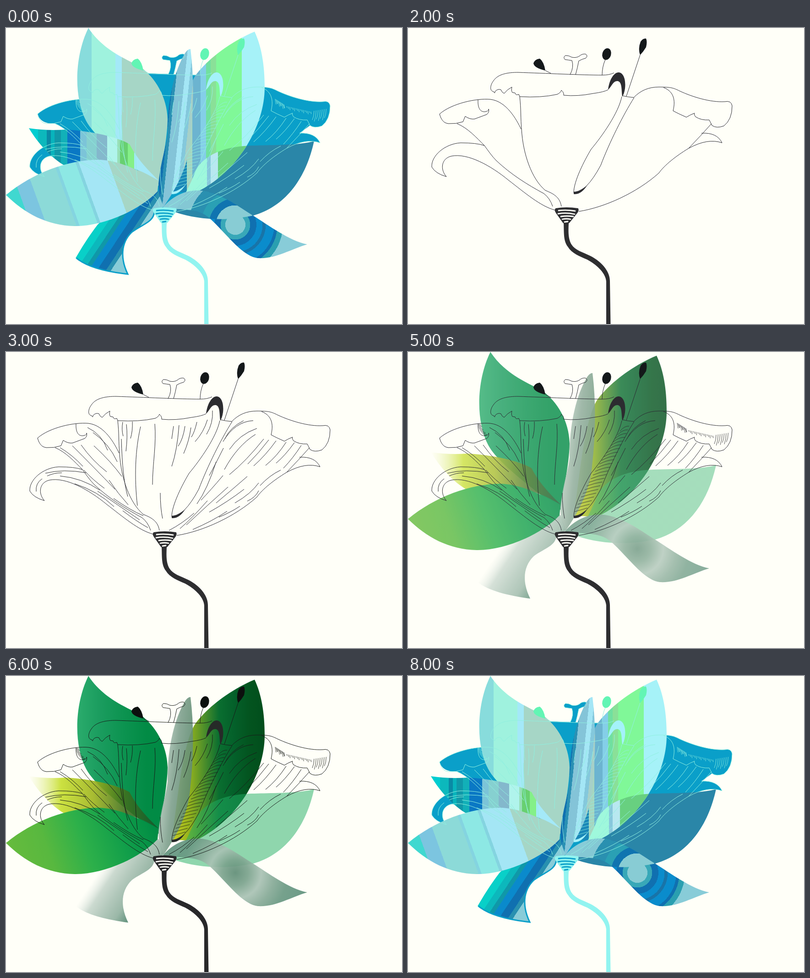
Recreate the animation shown at these times as an HTML page. Size 865x647 px, loop 9000 ms.

```html
<!DOCTYPE html>
<html lang="en">
<head>
<meta charset="utf-8">
<title>Flower</title>
<style>
html, body { margin: 0; width: 100%; height: 100%; overflow: hidden; background: #fffff8; }
svg { position: absolute; left: 0; top: 0; display: block; }
</style>
</head>
<body>
<svg id="stage" width="865" height="647" viewBox="0 0 865 647"></svg>
<script>
const BG = '#fffff8';

const leaf = {
  H: 'M333 356C290 378 235 395 200 430C180 456 164 482 152 503C180 525 230 534 267 539C250 505 250 470 275 446C300 428 322 424 324 402L345 390Z',
  A: 'M180 0C150 60 147 150 175 203C192 235 240 275 333 345C338 305 352 250 353 200C352 150 325 108 295 86C265 68 215 52 180 0Z',
  B: 'M50 219Q90 225 130 222C175 224 240 236 270 254C287 288 312 312 334 334C310 320 290 309 268 305L125 299C95 280 70 252 50 219Z',
  C: 'M0 365C60 315 140 287 205 288C250 290 300 315 333 336L331 357C290 400 210 434 150 433C90 432 40 405 0 365Z',
  E: 'M543 8C490 30 440 68 413 105C385 150 375 270 362 358L413 360C500 320 565 220 565 130C565 80 558 40 543 8Z',
  F: 'M673 247C640 258 560 255 520 258C470 262 432 280 415 310C402 345 385 375 368 402C430 423 490 420 540 410C610 390 655 330 673 247Z',
  G: 'M343 392C365 366 395 352 430 356C470 362 508 390 538 409C572 430 620 466 658 473C620 484 590 505 550 503C512 498 475 440 440 412C420 395 380 395 343 396Z',
  D: 'M403 46Q395 46 387 62C364 105 352 170 353 230C350 260 338 290 333 340Q333 370 345 390C365 360 397 310 402 250C410 180 411 110 403 46Z'
};

// gradient axes: x1 y1 x2 y2, or cx cy r
const axis = {
  H: [153, 502, 250, 566], A: [157, 0, 357, 0], B: [50, 0, 330, 0],
  C: [0, 365, 302, 256], E: [365, 0, 565, 0], X: [365, 0, 565, 0],
  F: [368, 0, 673, 0], G: [501, 430, 170], Y: [501, 430, 170], D: [350, 0, 433, 9]
};

// band ends in percent
const cuts = {
  H: [13, 25, 33, 46, 60, 68, 100], A: [15, 41, 48, 100],
  B: [7, 14, 17, 20, 25, 30, 40, 45, 53, 61, 69, 71, 77, 82, 100],
  C: [9, 19, 38, 40, 52, 54, 73, 100], E: [15, 21, 30, 36, 41, 47, 75, 100],
  X: [37, 41, 49, 100], F: [100], G: [13, 19, 27, 35, 39, 50, 54, 61, 100],
  Y: [25, 34, 44, 60, 100], D: [20, 32, 40, 62, 75, 85, 100]
};

const lime = {
  base: '#00d838', ink: '#90ff70', stem: '#98ff98', dot: '#90ff58', lip: '#a2ffb8',
  H: '#00e000 #00c010 #08a030 #00d850 #18b450 #20b860 #88dc98',
  A: '#90e896 #aefba0 #a2ffbc #b8bfa6',
  B: '#00d838 #00c80c #009c2c #00d030 #08a83c #08d040 #00d850 #7be080 #8edc85 #88cc98 #b0ffc0 #b8e8a0 #d8c860 #ffe860 #a0ffc0',
  C: '#45e84a #74e095 #8ce58a #80e59a #90ee8c #84e59c #a5ffb8 #b8bfa6',
  E: '#1cb850 #b8c0a4 #60d080 #98f0a8 #c8d890 #d0c898 #dcff78 #a2ffb0',
  X: '#a0f8a0 #88dca0 #c0ffd0 #d8d068', F: '#22ab4a',
  G: '#90e0a0 #40c080 #18b058 #00d850 #20a848 #00d850 #20a848 #18b860 #88dc98',
  Y: '#88d898 #20b850 #38c83c #30b850 #84dc90',
  D: '#00c840 #129c46 #1cb050 #88d896 #a2ffb8 #8cd896 #b4c8a4'
};

const blue = {
  base: '#0a9fc9', ink: '#90f0e0', stem: '#92f4f0', dot: '#62f5b4', lip: '#a4f2fa',
  H: '#08d0c8 #0cb8bc #1098a8 #0a8acc #1070b0 #2890b0 #88ccd8',
  A: '#88dcdc #9ff2de #a4e9f8 #a6d6c6',
  B: '#00cdd0 #0cb8bc #0a8aa5 #08b4bc #1098a8 #12b0b8 #0a78c4 #7cc4d8 #86d0d0 #84b8cc #b0f4ec #98e0b8 #68d070 #84f088 #a4e9f8',
  C: '#40d8d0 #7cc5e0 #8cdad8 #84d4e0 #8de8e4 #84d4e0 #a4e6f5 #a6d6c6',
  E: '#1a88b8 #a6d6c0 #6cb4d0 #84cfe8 #70e0a0 #8ae098 #80f898 #a6f2f8',
  X: '#9ff8dc #88c8dc #b8e8f0 #68d080', F: '#2a86a8',
  G: '#88ccd4 #38a8b8 #1070b0 #0a8ccc #1874a8 #0a8ccc #1070b0 #2a9fb0 #88ccd8',
  Y: '#88ccd4 #1074b0 #2aa0b4 #2a90b0 #84c8d4',
  D: '#0a80c4 #1070b0 #2a90b4 #84c4d8 #a4e6f5 #84c8dc #a6d0c8'
};

const green = {
  H: '#e4ece600 #ccdad0 #b2c8bb #9bb8a8 #5f907a',
  A: '#2aab6c #1a9c5e #0c9350 #028b45 #008a45',
  B: '#e0ec9000 #c6de2c #9fb51c #3f701e #14572c',
  C: '#66bb3d #58b83f #2db04a #129f4a #008c44',
  E: '#c4cc22 #98b41c #50902a #0a6e30 #04602a #03541f #024e1c',
  F: '#1fad62',
  G: '#5f8d76 #7ba38d #a9c2b4 #86aa97 #6a9983 #649580 #5f907a',
  D: '#b9ccc0 #a3bcae #7d9f8c #6a937b #5f8a70'
};

const silhouette =
  'M69 188C95 165 150 153 180 156C215 160 237 200 247 221L244 150L310 99L424 103L468 150L494 151C508 137 525 129 548 129C575 129 580 131 594 138C620 150 660 163 692 161Q706 158 708 170Q708 200 690 214Q674 220 664 213L641 230Q675 228 686 251Q655 240 613 263C585 280 560 300 548 317C500 360 430 392 373 401L321 398C255 370 180 285 95 280C72 285 70 310 84 325Q60 318 52 304C50 280 80 253 115 251Q150 251 167 257C150 240 130 218 107 209Q75 210 69 188Z';

const pistil = 'M354 102Q363 85 358 71Q350 70 343 69Q338 64 344 60Q352 60 358 64Q368 66 375 61Q380 56 388 57Q394 61 388 66Q380 68 373 72Q370 88 366 102';

const outline = [
  'M247 221C237 200 215 160 180 156C150 153 95 165 69 188C72 200 78 208 88 209Q105 210 120 205L125 193Q135 200 145 199L172 189Q178 184 176 177C177 180 174 182 168 183C158 184 152 175 153 157',
  'M107 209C130 218 150 240 167 257C175 268 183 280 193 290C225 320 260 342 297 362Q310 372 316 390',
  'M167 257Q150 251 115 251C80 253 50 280 52 304Q60 318 84 325C70 310 72 285 95 280C130 273 180 300 220 333C255 360 290 390 321 398',
  'M187 139C178 138 179 125 187 115C197 100 220 97 240 97C300 99 380 103 424 103Q440 103 450 98M187 139Q190 145 190 139Q196 132 203 135Q205 141 210 143Q217 134 227 129Q225 137 228 141L234 142Q235 148 242 145L244 150Q290 153 326 145Q334 141 335 136Q341 141 340 147Q370 150 405 143Q428 140 437 135',
  'M244 150C247 175 246 200 248 221C251 275 270 330 300 355C318 362 332 370 335 390',
  'M467 150C460 185 425 235 400 265C385 290 362 335 362 360M468 148Q480 151 494 152C470 190 440 250 421 300Q405 330 390 345',
  'M494 151C508 137 525 129 548 129C575 129 580 131 594 138C620 150 660 163 692 161Q706 158 708 170Q708 200 690 214Q674 220 664 213Q660 205 658 201Q640 202 628 194Q624 188 626 186Q616 190 608 195Q592 188 579 181C583 165 585 140 558 130',
  'M663 209Q640 235 613 263C585 280 560 300 548 317C500 360 430 392 373 401M641 230Q675 228 686 251Q655 240 613 263',
  pistil,
  'M300 93L312 99M431 69Q424 85 424 103M507 59L477 149'
];

const veins = [
  'M255 153Q252 170 256 184M263 158Q266 185 262 217M276 152Q277 172 272 189M252 190Q254 275 266 316M294 163C282 215 280 275 287 336M325 157C329 200 320 245 320 290M337 308Q337 340 342 364M366 162L362 190M378 160Q374 215 362 250M391 162Q387 190 376 206M404 165Q400 195 388 222M417 153Q412 175 405 186M440 148Q432 175 413 196M451 128Q453 155 438 180',
  'M118 209Q145 225 168 250M145 205Q190 250 238 300M164 203Q188 237 220 262M178 165Q210 180 222 215M190 176Q225 200 243 240M170 258Q190 280 215 298M192 205Q230 240 253 272M225 280Q245 310 267 334M235 320Q270 345 300 358',
  'M66 305Q64 287 79 277M86 265Q125 255 175 264M90 271Q105 264 122 264M118 271Q165 275 205 302M150 288Q200 304 236 338M200 304Q245 335 292 367M255 347Q285 370 310 384',
  'M540 150Q500 152 474 196M519 150Q489 165 478 190M548 167Q510 180 488 213M475 210Q455 250 444 270M545 180Q505 205 477 257M563 190Q525 238 488 268M590 194Q568 225 541 249M612 197Q592 228 567 248M574 192Q553 220 528 245M630 198Q610 226 590 243M645 204Q627 232 606 254',
  'M459 240Q440 300 417 332M474 270Q447 302 426 324M527 272Q495 300 459 330M485 295Q440 335 394 378M552 286Q535 310 500 330M552 303Q545 318 527 326M520 300Q485 327 444 350M600 258Q575 270 555 292M511 337Q492 350 465 361M483 348Q450 370 408 388M440 325Q405 365 380 386M411 352Q385 375 356 390'
];

const anthers = 'M300 93Q275 87 274 77Q277 68 288 67Q297 74 300 93ZM507 59Q502 45 508 30Q513 22 520 23Q523 30 520 42Q514 52 507 59Z';
const crescent = 'M437 135C440 112 450 97 460 97C472 98 476 115 474 132Q472 145 468 150C466 135 468 118 458 116C448 115 445 128 437 135ZM362 358Q375 358 392 343Q378 365 362 363Z';

const path = (d, attrs) => `<path d="${d}" ${attrs}/>`;
const mix = (a, b, t) => a + (b - a) * t;

function hatch() {
  let d = '';
  for (let i = 0; i < 23; i++) {
    const t = i / 22, y = mix(166, 342, t);
    const l = 364 + 99 * Math.pow(1 - t, 1.15), r = mix(483, 392, Math.pow(t, 1.15));
    d += `M${l} ${y + 7}Q${mix(l, r, .5)} ${y - 5 + 8 * t} ${r} ${y - 4 + 3 * t}`;
  }
  for (let i = 0; i < 11; i++) {
    d += `M${153 + i * i * .13} ${158 + i * 2.4}l${6 + i % 3} ${1 - i * .25}`;
    d += `M${588 + i * 1.9} ${155 + i * 1.2}l${2 + i % 2} ${12 - i % 4 * 2}`;
  }
  for (let i = 0; i < 17; i++) d += `M${613 + i * 3.3} ${171 + i * .75}l1 ${3 + i % 3 * 2}`;
  for (let i = 0; i < 7; i++) d += `M${673 + i * 4.4} ${181 - i * .7}q0 12 -4 ${20 + i % 2 * 4}`;
  return d;
}

function gradient(id, key, colors, ends) {
  const a = axis[key], list = colors.split(' ');
  const stop = (at, c) => `<stop offset="${at}%" stop-color="${c}"/>`;
  const stops = list.map((c, i) => ends
    ? stop(i ? ends[i - 1] : 0, c) + stop(ends[i], c)
    : stop(100 * i / Math.max(1, list.length - 1), c)).join('');
  const tag = a.length === 3 ? 'radialGradient' : 'linearGradient';
  const names = a.length === 3 ? ['cx', 'cy', 'r'] : ['x1', 'y1', 'x2', 'y2'];
  const pos = names.map((n, i) => `${n}="${a[i]}"`).join(' ');
  return `<${tag} id="${id}" gradientUnits="userSpaceOnUse" ${pos}>${stops}</${tag}>`;
}

function defs(name, theme, banded) {
  return Object.keys(axis).filter(k => theme[k])
    .map(k => gradient(name + k, k, theme[k], banded && cuts[k])).join('');
}

const fill = (name, k, extra = '') => path(leaf[k], `fill="url(#${name}${k})" ${extra}`);

function bandedLeaves(name, theme) {
  const f = k => fill(name, k);
  return path(silhouette + pistil, `fill="${theme.base}"`) +
    f('H') + path('M154 503C180 525 230 534 266 538C250 505 250 470 275 446C300 428 322 424 324 402', `fill="none" stroke="${theme.base}" stroke-width="3"`) +
    f('A') + f('B') + f('C') + f('F') + f('E') +
    path(leaf.F, `fill="url(#${name}X)" clip-path="url(#inE)"`) +
    f('G') + path(leaf.G, `fill="url(#${name}Y)" clip-path="url(#inF)"`) + f('D');
}

function greenLeaves() {
  const f = (k, extra) => fill('g', k, extra);
  return f('H') + f('A') + f('B', 'opacity=".9"') + f('C') + f('E') + f('F', 'opacity=".5"') +
    f('G', 'opacity=".92"') + f('D', 'opacity=".9"');
}

const line = (d, w = 1) => path(d, `fill="none" stroke="currentColor" stroke-width="${w}" stroke-linejoin="round"`);

function flower({ ink, stem, dot, lip, base }, detail) {
  const cup = 'M323 395Q346 391 371 395Q373 399 369 404L352 425Q345 431 339 425L324 404Q320 398 323 395Z';
  const gaps = 'M329 399Q347 397 365 400M328 406Q346 403 364 407M334 412Q347 410 361 412M337 418Q346 416 355 418M342 424L349 423';
  return `<g color="${ink}">` + outline.map(d => line(d)).join('') +
    (detail > 0 ? veins.map(d => line(d)).join('') : '') +
    (detail > 1 ? line(hatch(), .8) : '') + '</g>' +
    path(crescent, `fill="${lip}"`) + path(anthers, `fill="${dot}"`) +
    `<ellipse cx="434" cy="57" rx="9.5" ry="13" transform="rotate(15 434 57)" fill="${dot}"/>` +
    path('M340 427L351 427C350 446 350 461 357 473C365 486 382 490 398 498C420 509 441 530 441 553L442.500 647L433 647L433 554C432 536 412 517 391 506C375 499 358 493 349 478C339 465 341 446 340 427Z', `fill="${stem}"`) +
    path(cup, `fill="${stem}" stroke="${stem}" stroke-width="2"`) +
    path(gaps, `fill="none" stroke="${base}" stroke-width="2.8" stroke-linecap="round"`);
}

const dark = { ink: '#2c2c34', stem: '#2e2e30', dot: '#14181a', lip: '#2c2c30', base: BG };
const black = { ink: '#181c1a', stem: '#28282a', dot: '#0c100e', lip: '#262a28', base: BG };

const scenes = {
  blank: '',
  outline: flower(dark, 0),
  veined: flower(dark, 1),
  hatched: flower(dark, 2),
  pale: `<g opacity=".8">${greenLeaves()}</g>` + flower(dark, 2),
  green: greenLeaves() + flower(black, 2),
  lime: bandedLeaves('l', lime) + flower(lime, 2),
  blue: bandedLeaves('b', blue) + flower(blue, 2)
};
const order = ['blue', 'blank', 'outline', 'veined', 'hatched', 'pale', 'green', 'lime', 'blue'];

const stage = document.getElementById('stage');
stage.innerHTML = '<defs>' + defs('g', green) + defs('l', lime, true) + defs('b', blue, true) +
  `<clipPath id="inE">${path(leaf.E, '')}</clipPath><clipPath id="inF">${path(leaf.F, '')}</clipPath></defs>` +
  Object.keys(scenes).map(k => `<g id="${k}" visibility="hidden">${scenes[k]}</g>`).join('');

const start = performance.now();
let shown = null;
function tick() {
  const step = Math.floor((performance.now() - start) / 1000) % order.length;
  const next = document.getElementById(order[step]);
  if (next !== shown) {
    if (shown) shown.setAttribute('visibility', 'hidden');
    next.setAttribute('visibility', 'visible');
    shown = next;
  }
  requestAnimationFrame(tick);
}
tick();
</script>
</body>
</html>
```
